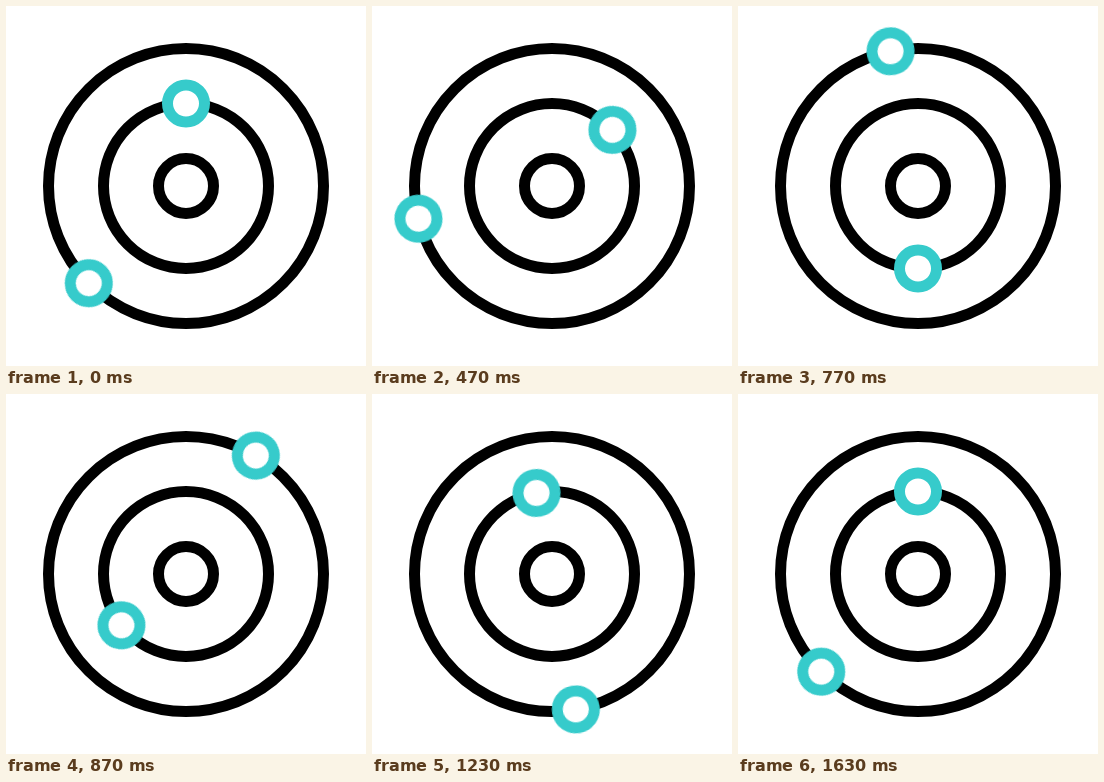
Write an HTML page that moves like this. It is 360x360 px and loops after 1.67 s.

```html
<!DOCTYPE html>
<html lang="en">
<head>
<meta charset="utf-8">
<title>Orbits</title>
<style>
  html, body { margin: 0; width: 100%; height: 100%; overflow: hidden; background: #fff; }
  svg { display: block; width: 100vw; height: 100vh; }
  circle { fill: none; stroke: #000; stroke-width: 11; }
  .ball { fill: #fff; stroke: #36cbcb; }
  g { transform-origin: 180px 180px; }
</style>
</head>
<body>
<svg viewBox="0 0 360 360">
  <circle cx="180" cy="180" r="137.5"/>
  <circle cx="180" cy="180" r="82.5"/>
  <circle cx="180" cy="180" r="27.5"/>
  <g id="outer"><circle class="ball" cx="180" cy="42.5" r="18.5"/></g>
  <g id="inner"><circle class="ball" cx="180" cy="97.5" r="18.5"/></g>
</svg>
<script>
  const LOOP = 1670, STEPS = 50;

  // One full turn each; begin and end are counted in steps of 1/30 s.
  const orbits = [
    { id: 'outer', from: 225, begin: 4, end: 50 },
    { id: 'inner', from: 0, begin: 4, end: 42 }
  ];

  // Same curve as cubic-bezier(.46, 0, .54, 1), solved by bisection.
  function ease(t) {
    if (t <= 0) return 0;
    if (t >= 1) return 1;
    let lo = 0, hi = 1, u = t;
    for (let i = 0; i < 30; i++) {
      u = (lo + hi) / 2;
      const x = 3 * u * (1 - u) * (0.46 * (1 - u) + 0.54 * u) + u ** 3;
      if (x < t) lo = u; else hi = u;
    }
    return u * u * (3 - 2 * u);
  }

  function keyframes({ from, begin, end }) {
    const frames = [];
    for (let k = 0; k <= STEPS; k++) {
      const start = Math.round(k * 10 / 3) * 10;
      const angle = from + 360 * ease((k - begin) / (end - begin));
      frames.push({
        offset: k === STEPS ? 1 : Math.max(0, start - 1) / LOOP,
        transform: `rotate(${angle.toFixed(3)}deg)`,
        easing: 'steps(1, end)'
      });
    }
    return frames;
  }

  for (const orbit of orbits) {
    document.getElementById(orbit.id)
      .animate(keyframes(orbit), { duration: LOOP, iterations: Infinity });
  }
</script>
</body>
</html>
```
